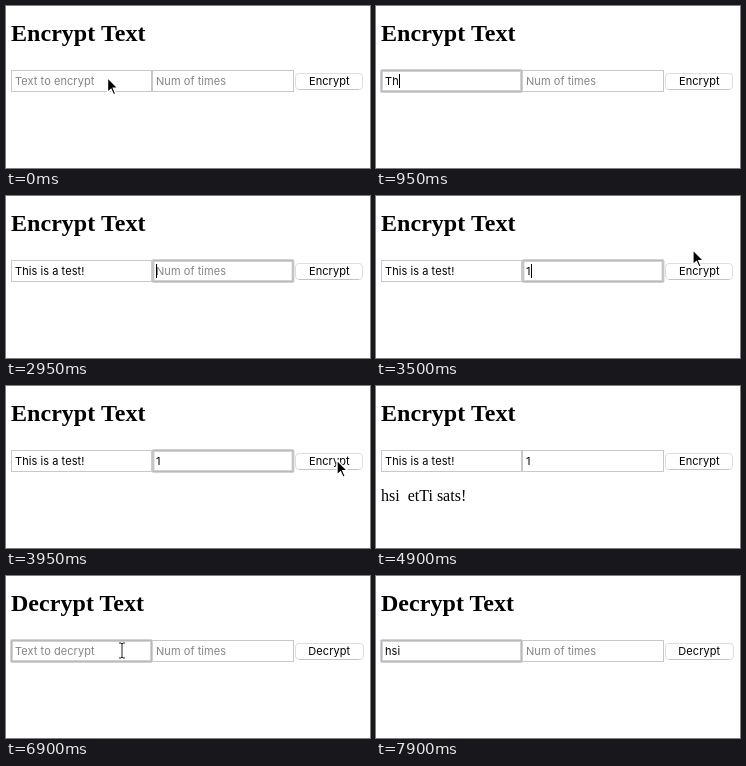
Animation, 364 px wide and 162 px high, one loop 8000 ms. Source, as an HTML page:

```html
<!DOCTYPE html>
<html lang="en">
<head>
<meta charset="utf-8">
<title>Encrypt and decrypt</title>
<style>
  html, body { margin: 0; width: 100%; height: 100%; overflow: hidden; background: #fff; }
  svg { display: block; width: 364px; height: 162px; }
  text { font: 11px Inter, "Open Sans", sans-serif; letter-spacing: .06px; white-space: pre; }
  #title, #result { font: 16px "Liberation Serif", "Times New Roman", serif; letter-spacing: 0; }
  #title { font-size: 24px; font-weight: bold; letter-spacing: .04px; }
  .field { fill: #fff; stroke: #c8c8c8; }
  .hint { fill: #858585; }
  #ring rect { fill: none; stroke: #d2d2d2; stroke-width: 3; }
  #ring rect + rect { stroke: #b9b9b9; stroke-width: 1; }
</style>
</head>
<body>
<svg viewBox="0 0 364 162">
  <text id="title" x="5" y="35"></text>
  <rect class="field" x="5.5" y="64.5" width="140" height="21"/>
  <rect class="field" x="146.5" y="64.5" width="141" height="21"/>
  <g id="ring">
    <rect x=".5" y="64.5" width="140" height="21" rx="1"/>
    <rect x=".5" y="64.5" width="140" height="21"/>
  </g>
  <text id="first" x="9" y="79"></text>
  <text id="second" x="150" y="79"></text>
  <rect id="caret" y="68" width="1" height="14"/>
  <rect id="button" x="289.5" y="67.5" height="16" rx="3.5" fill="#fff" stroke="#dedede"/>
  <path d="M293 83.5H353" stroke="#c4c4c4"/>
  <text id="label" x="323.3" y="79" text-anchor="middle"></text>
  <text id="result" x="5" y="115">hsi  etTi sats!</text>
  <path id="arrow" d="M0 0V15L3.5 11.8L6 17.3L8.3 16.2L5.9 10.8H10.6Z" stroke="#fff" stroke-width="1.4"/>
  <path id="beam" d="M-2 -5H0L1 -4L2 -5H4M1 -4V9M-2 10H0L1 9L2 10H4" fill="none" stroke="#222"/>
</svg>
<script>
const $ = id => document.getElementById(id);
const LOOP = 8000, STEP = 50, SWITCH = 5400, BLINK = 300;

// Typing runs: one character every `pace` ms
const encryptRun = { text: 'This is a test!', start: 750, pace: 103 };
const timesRun = { text: '1', start: 3000, pace: 100 };
const decryptRun = { text: 'hsi  ', start: 7100, pace: 120 };

// Pointer moves: a curve from `from` past `via` to `to`, then rest until `hide`
const moves = [
  { start: 0, time: 1, hide: 750, from: [101.5, 71.5], via: [101.5, 71.5], to: [101.5, 71.5] },
  { start: 3250, time: 700, hide: 4900, from: [115, 72], via: [378, 33], to: [331, 74] },
  { start: 5900, time: 300, hide: 7100, from: [354, 28], via: [226, 176], to: [115, 72] }
];

const show = (id, on) => $(id).style.display = on ? '' : 'none';

function typed({ text, start, pace }, t) {
  return text.slice(0, Math.max(0, Math.floor((t - start) / pace) + 1));
}

function pointerAt(t) {
  const m = moves.find(m => t >= m.start && t < m.hide);
  if (!m) return null;
  const left = 1 - Math.min(1, (t - m.start) / m.time);
  const s = 1 - left * left;
  return m.from.map((a, i) => (1 - s) ** 2 * a + 2 * s * (1 - s) * m.via[i] + s * s * m.to[i]);
}

function fill(id, value, hint) {
  $(id).textContent = value || hint;
  $(id).setAttribute('class', value ? '' : 'hint');
}

function drawCaret(t, id, run, value, focusTime) {
  const lastKey = value ? run.start + (value.length - 1) * run.pace : focusTime;
  const beat = t % (2 * BLINK);
  show('caret', t - lastKey < BLINK || beat < 100 || beat >= 100 + BLINK);
  const width = value ? $(id).getComputedTextLength() : 0;
  $('caret').setAttribute('x', Math.floor(+$(id).getAttribute('x') + .6 + width));
}

function draw(t) {
  const encrypting = t < SWITCH;
  const word = encrypting ? 'Encrypt' : 'Decrypt';
  $('title').textContent = word + ' Text';
  $('label').textContent = word;
  $('button').setAttribute('width', encrypting ? 67 : 68);

  const run = encrypting ? encryptRun : decryptRun;
  const text = typed(run, t);
  const times = encrypting ? typed(timesRun, t) : '';
  fill('first', text, 'Text to ' + word.toLowerCase());
  fill('second', times, 'Num of times');
  show('result', t >= 4150 && encrypting);

  const onSecond = t >= 2650 && t < 4100;
  const onFirst = t >= 450 && t < 2650 || t >= 6400;
  show('ring', onFirst || onSecond);
  $('ring').setAttribute('transform', `translate(${onSecond ? 146.5 : 5})`);
  if (onFirst) drawCaret(t, 'first', run, text, encrypting ? 450 : 6400);
  else if (onSecond) drawCaret(t, 'second', timesRun, times, 2650);
  else show('caret', false);

  const p = pointerAt(t);
  const overField = p && t >= 200 && p[0] < 288 && p[1] > 64 && p[1] < 86;
  show('arrow', p && !overField);
  show('beam', overField);
  if (p) $(overField ? 'beam' : 'arrow').setAttribute('transform', `translate(${p})`);
}

const start = performance.now();
function tick() {
  const t = (performance.now() - start) % LOOP;
  draw(Math.floor(t / STEP) * STEP);
  requestAnimationFrame(tick);
}
tick();
</script>
</body>
</html>
```
